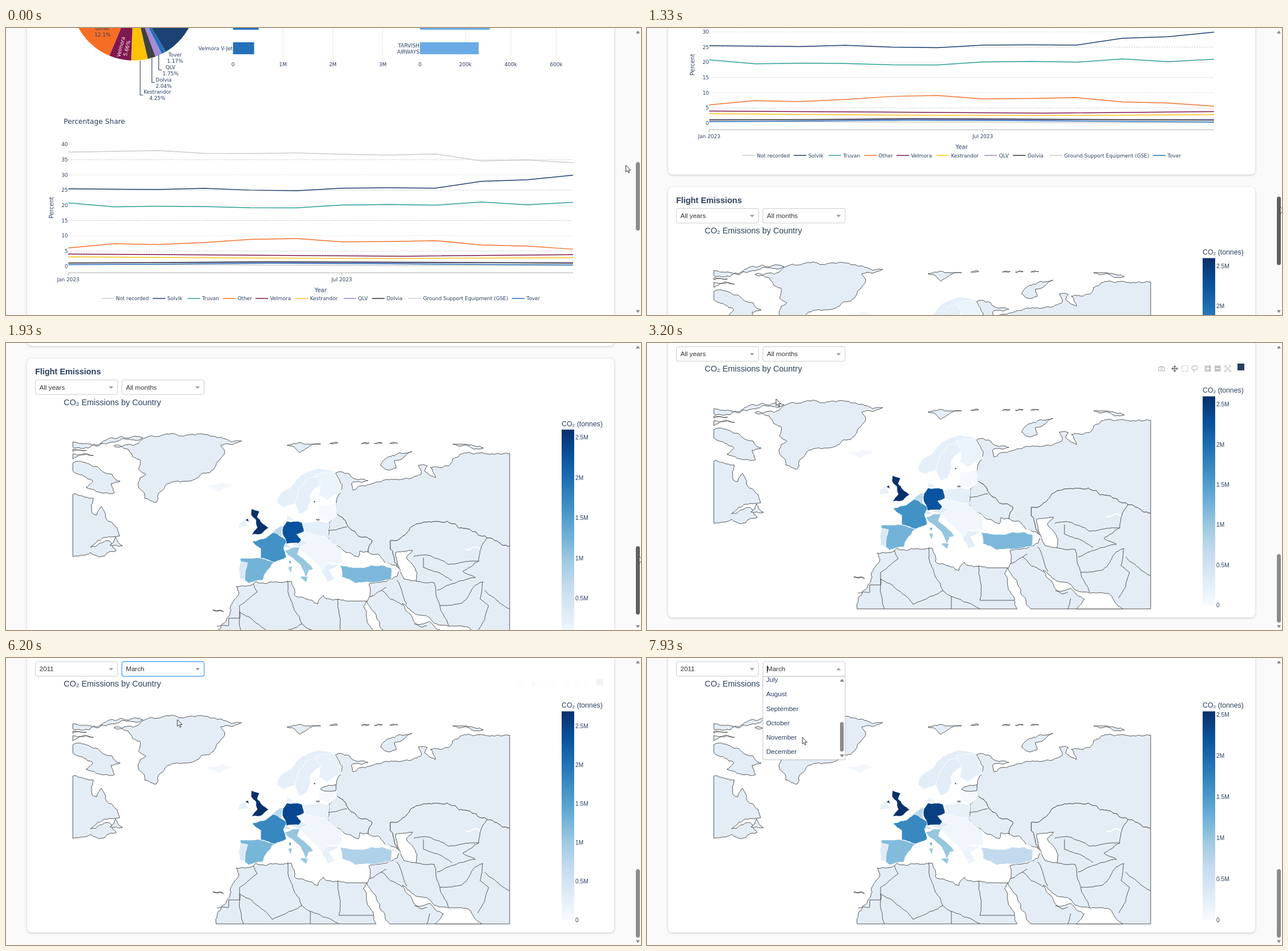
Animation of 1112x503 px, one loop 8 s. Source, as an HTML page:

```html
<!DOCTYPE html>
<html lang="en">
<head>
<meta charset="utf-8">
<title>Flight dashboard</title>
<style>
  html, body { margin: 0; height: 100%; overflow: hidden; background: #fafafa; }
  svg { display: block; }
  text { white-space: pre; }
  .card { fill: #fff; filter: drop-shadow(0 1px 2px #0003); }
  .share { font: 8.85px "DejaVu Sans", Verdana, sans-serif; fill: #2a3f5f; }
  .map { font: 10.2px "Liberation Sans", Arial, sans-serif; fill: #2a3f5f; }
  .land, .sea, .border { fill: #e4edf5; stroke: #444; stroke-width: .9; stroke-linejoin: round; }
  .sea { fill: #fff; }
  .border { fill: none; }
  .country { stroke: #fff; stroke-width: .8; stroke-linejoin: round; }
  .control { font-size: 11.6px; }
</style>
</head>
<body>
<svg id="stage" width="1112" height="503" viewBox="0 0 1112 503"></svg>
<script>
const LOOP = 8000, PAGE_SCROLL = 560.5, ROW = 25.3;

const $ = id => document.getElementById(id);
const text = (x, y, s, attrs = '') => `<text x="${x}" y="${y}" ${attrs}>${s}</text>`;
const middle = (x, y, s, attrs = '') => text(x, y, s, `text-anchor="middle" ${attrs}`);
const rect = (x, y, w, h, attrs) => `<rect x="${x}" y="${y}" width="${w}" height="${h}" ${attrs}/>`;
const path = (d, attrs) => `<path d="${d}" ${attrs}/>`;
const range = (n, f) => Array.from({ length: n }, (_, i) => f(i)).join('');

// Monotone cubic through keys [time, ...values]
function track(keys, t) {
  const last = keys.length - 1;
  if (t <= keys[0][0]) return keys[0].slice(1);
  if (t >= keys[last][0]) return keys[last].slice(1);
  const i = keys.findIndex(k => k[0] > t) - 1;
  const span = keys[i + 1][0] - keys[i][0], u = (t - keys[i][0]) / span;
  return keys[i].slice(1).map((a, n) => {
    const c = n + 1, b = keys[i + 1][c];
    const slope = j => (keys[j + 1][c] - keys[j][c]) / (keys[j + 1][0] - keys[j][0]);
    const tangent = j => {
      if (j === 0 || j === last) return 0;
      const p = slope(j - 1), q = slope(j);
      return p * q > 0 ? 2 * p * q / (p + q) : 0;
    };
    const v = 1 - u;
    return a * v * v * (1 + 2 * u) + b * u * u * (3 - 2 * u)
      + span * u * v * (v * tangent(i) - u * tangent(i + 1));
  });
}

// ---------- aircraft share charts ----------
const monthX = m => 109 + 884 * (m * 30.4 - (m > 1 && m < 7 ? 1 : 0)) / 334.4;
const valueY = v => 417.5 - v * 5.335;

// Values are spread evenly over the twelve months
function series(name, color, x, values) {
  const points = values.map((v, i) => `${monthX(11 * i / (values.length - 1))},${valueY(v)}`).join(' ');
  return `<polyline points="${points}" fill="none" stroke="${color}" stroke-width="1.5"/>`
    + path(`M${x},474h22`, `stroke="${color}" stroke-width="1.5"`) + text(x + 25.5, 477.2, name);
}

function pie() {
  const cx = 223.5, cy = -53, r = 110;
  const at = deg => `${cx + r * Math.sin(deg * Math.PI / 180)},${cy + r * Math.cos(deg * Math.PI / 180)}`;
  let angle = 150;
  const slice = (sweep, color) => {
    const from = at(angle);
    angle -= sweep;
    return path(`M${cx},${cy}L${from}A${r},${r} 0 0 1 ${at(angle)}Z`, `fill="${color}"`);
  };
  return slice(119.2, '#1c4173') + slice(4.2, '#2471b9') + slice(6.3, '#a58bd8') + slice(7.3, '#404040')
    + slice(15.3, '#ffc107') + slice(20.4, '#7f1750') + slice(43.6, '#f76d23');
}

const sliceLabel = (name, share, x, y) => middle(x, y, name) + middle(x, y + 11, share);

function bars(x, step, labels, color, widths) {
  return labels.map((label, i) => {
    const gx = x + i * step;
    return (i ? path(`M${gx},0V57`, 'stroke="#ccc" stroke-width=".8" stroke-dasharray="2 2"') : '')
      + middle(gx, 66.5, label);
  }).join('') + widths.map((w, i) => rect(x, -18 + i * 43, w, 21, `fill="${color}"`)).join('');
}

const shareCard = rect(37, -60, 1028, 567.5, 'rx="8" class="card"') + '<g class="share">'
  + pie() + middle(169, 4, 'Other') + middle(169, 15, '12.1%')
  + `<g transform="translate(206 34) rotate(-76)" fill="#fff">${sliceLabel('Velmora', '5.66%', 0, -2)}</g>`
  + sliceLabel('Tover', '1.17%', 296, 50) + sliceLabel('QLV', '1.75%', 288, 72)
  + sliceLabel('Dolvia', '2.04%', 276, 93.5) + sliceLabel('Kestrandor', '4.25%', 265, 115)
  + path('M267.5,47V73.5H273M255.5,53V95.5H261M235,57V117.5H240', 'fill="none" stroke="#2a3f5f" stroke-width="1.1"')
  + bars(397.5, 87.4, ['0', '1M', '2M', '3M'], '#2471b9', [45, 37])
  + bars(724.8, 79.6, ['0', '200k', '400k', '600k'], '#6aabe6', [122.5, 103])
  + text(397, 39, 'Velmora V-Jet', 'text-anchor="end"')
  + text(724, 33.5, 'TARVISH', 'text-anchor="end"') + text(724, 44.5, 'AIRWAYS', 'text-anchor="end"')
  + text(101, 167.5, 'Percentage Share', 'font-size="12.2"')
  + range(7, i => path(`M109,${valueY(5 * i + 5)}H993`,
    `stroke="${i % 2 ? '#ddd' : '#c4c4c4'}" stroke-dasharray="2.2 2.2"`))
  + range(9, i => text(108.5, valueY(5 * i) + 3.3, 5 * i, 'text-anchor="end"'))
  + path('M109,434V429H993M588,429V434', 'fill="none" stroke="#c8c8c8" stroke-width="1.5"')
  + middle(109, 443.5, 'Jan 2023') + middle(588, 443.5, 'Jul 2023')
  + middle(551, 462.5, 'Year', 'font-size="10.1"')
  + middle(0, 0, 'Percent', 'font-size="10.1" transform="translate(83 315) rotate(-90)"')
  + series('Not recorded', '#ccc', 167, [37.5, 37.7, 38, 37.05, 37, 37.2, 36.8, 36.5, 36.9, 34.6, 34.9, 34])
  + series('Solvik', '#1c4173', 257, [25.45, 25.3, 25.2, 25.6, 25, 24.8, 25.65, 25.75, 25.65, 27.9, 28.4, 29.9])
  + series('Truvan', '#2ca098', 318, [20.8, 19.5, 19.7, 19.6, 19.2, 19.15, 20.1, 20.3, 20.05, 21.1, 20.2, 21])
  + series('Other', '#f3722c', 380, [6, 7.4, 7.1, 7.8, 8.8, 9.1, 8, 8.1, 8.4, 7, 6.6, 5.6])
  + series('Velmora', '#7f1750', 437, [4, 3.65, 3.3, 3.8])
  + series('Kestrandor', '#fcc21b', 507, [3.1, 2.7, 2.55, 2.8])
  + series('QLV', '#9b85d0', 591, [1.1, 1.2, 1.1, 1.2])
  + series('Dolvia', '#333', 641, [1.1, 1.2, 1.5, 1.35, 1.2, 1])
  + series('Ground Support Equipment (GSE)', '#ccc', 705, [.6, .4, .2, .3])
  + series('Tover', '#2471b9', 886, [.5, .7, 1, .85, .6, .4])
  + '</g>';

// ---------- emissions map ----------
// Repeatable noise by place, so that shared edges of neighbours agree
const noise = (x, y) => {
  const n = Math.sin(x * 12.9898 + y * 78.233) * 43758.5453;
  return n - Math.floor(n) - .5;
};

function roughen([ax, ay], [bx, by], amount) {
  const length = Math.hypot(bx - ax, by - ay);
  if (length < 5 || ax === bx || ay === by) return [[ax, ay]];
  const mx = (ax + bx) / 2, my = (ay + by) / 2;
  const mid = [mx + noise(mx, my) * length * amount, my + noise(my, mx) * length * amount];
  return [...roughen([ax, ay], mid, amount), ...roughen(mid, [bx, by], amount)];
}

function outline(points, amount, closed = true) {
  const list = points.split(' ').map(p => p.split(',').map(Number));
  const edges = closed ? list : list.slice(0, -1);
  const line = edges.flatMap((p, i) => roughen(p, list[(i + 1) % list.length], amount));
  return 'M' + (closed ? line : [...line, list.at(-1)]).join('L') + (closed ? 'Z' : '');
}

let terrain = '';
const fills = [];
const land = points => { terrain += path(outline(points, .3), 'class="land"'); };
const sea = points => { terrain += path(outline(points, .18), 'class="sea"'); };
const border = points => { terrain += path(outline(points, .15, false), 'class="border"'); };
// One fill for each filter state
const country = (points, ...colors) => {
  fills.push(colors);
  terrain += path(outline(points, .16), 'class="country"');
};

// North America and the Arctic
land('117,207 139,212 153,214 151,240 159,243 167,228 185,256 199,280 167,286 148,300 180,288 193,306 173,315 148,309 117,316');
land('182,296 192,282 204,297');
land('117,152 138,151 166,164 186,172 200,184 184,188 190,204 164,203 140,195 152,184 117,166');
land('117,115 200,106 240,108 175,119 117,124');
land('117,128 141,130 117,132');
land('117,136 153,139 117,145');
land('189,122 244,108 303,105 376,107 413,113 376,121 383,134 371,149 357,169 317,184 279,192 263,221 243,214 231,190 245,172 232,163 234,146 214,128');
land('492,121 522,119 551,119 515,134');
land('782,119 806,119 836,126 820,128');
land('656,156 690,134 711,132 680,148 683,161 664,163');
for (const x of [567, 622, 645, 672]) land(`${x},118 ${x + 7},116 ${x + 14},117`);

// Asia and Africa
land('577,170 602,172 634,183 605,188 608,200 622,192 662,182 712,178 727,171 722,156 738,157 733,166 752,178 743,160 775,157 782,145 832,134 882,135 882,298 842,283 812,268 773,254 735,256 706,270 673,288 673,303 692,338 663,326 634,308 641,288 605,270 580,242 578,222 587,203 589,190');
land('580,242 605,270 641,288 634,308 620,306 617,317 596,309 588,303 563,282 566,256');
land('692,338 673,303 673,288 706,270 735,256 773,254 812,268 842,283 882,298 882,466 672,466 650,426 632,395 636,364 674,356');
land('403,368 425,367 500,360 505,383 546,399 556,384 595,394 632,394 626,404 648,466 368,466 372,444 393,403 408,380');
land('362,410 368,411 381,413 370,412');
land('539,220 541,219 541,221');
land('543,251 549,250 549,252');
sea('682,309 712,305 701,317 720,345 718,359 697,355 685,326');
sea('694,398 717,417 742,423 750,433 810,440 833,466 752,466 766,449 742,430 720,435');

border('433,364 440,378 409,402 409,424 390,424 390,437 369,438');
border('409,413 453,443 466,458 518,434 505,410 493,358');
border('518,434 533,444 583,466');
border('581,390 583,451 643,451');
border('409,413 416,466');
border('533,444 533,466');
border('714,316 742,314 775,330 828,324 832,301 842,283');
border('731,318 731,335 760,345 781,358');
border('828,324 800,342 822,353 785,363 755,375');
border('718,359 750,362 760,402 775,437');
border('760,402 798,398 822,366 835,360');
border('835,360 830,390 845,402 826,447');
border('838,375 882,408');
border('684,357 695,382 702,400');
border('666,370 636,387');
border('657,375 694,401');
border('715,434 728,440 737,437');
border('742,448 737,466');
border('563,270 597,264');

// Europe
country('351,192 378,186 397,193 372,203', '#f3f7fc');
country('475,222 478,210 500,193 517,173 550,162 578,167 530,178 513,198 506,222 486,230', '#e5eff9', '#e6eefa', '#e2edf8');
country('506,222 513,198 530,178 548,176 551,190 532,207 534,218 526,236 513,242', '#e6eefa', '#e6eefa', '#e2edf8');
country('540,172 575,168 588,203 562,217 547,208 551,190', '#ebf3fb', '#e8f1fa', '#e5eff9');
country('548,226 578,222 580,242 566,255 548,250', '#f5f9fe');
country('406,266 410,256 418,251 425,263', '#e8f1fa');
country('491,254 492,243 506,252', '#e8f1fa');
country('509,277 522,273 563,282 588,303 588,328 562,328 553,341 527,314 515,300 517,288', '#f1f6fd');
country('520,258 548,253 566,258 563,282 522,273', '#e5eff9', '#e9f2fa', '#e9f2fa');
country('553,341 562,328 584,330 566,340 576,355 563,361', '#e3eef8', '#e8f1fa', '#eef4fb');
country('466,274 479,263 485,262 483,284', '#bcd8eb');
country('484,300 491,294 501,300', '#d3e4f3');
country('499,295 517,288 532,291 515,300', '#e0ecf7');
country('411,325 423,327 418,357 409,355', '#d9e8f5', '#dce9f6', '#e0ebf7');
country('410,319 432,319 459,323 470,326 453,347 449,358 425,363 418,357 423,327 411,325', '#73b3d8', '#78b6d9', '#82bbdb');
country('431,290 454,284 467,274 492,287 486,300 491,317 470,326 446,319 446,302', '#4292c6', '#3787c0', '#3989c1');
country('495,324 500,323 498,331', '#4292c6', '#3787c0', '#3989c1');
country('484,276 485,264 492,254 518,256 522,272 509,277 517,287 512,293 491,294', '#0a539e', '#084890', '#084083');
country('488,306 501,300 515,299 510,312 538,338 530,340 525,352 516,331 498,316', '#97c6df');
country('515,352 529,351 526,361', '#97c6df');
country('494,334 501,333 499,346', '#97c6df');
country('430,232 444,237 440,247 460,266 448,276 430,278 440,265 437,251 429,243', '#08306b');
country('418,252 424,249 426,256', '#08306b');
country('663,324 692,342 676,340', '#f0f5fb');
country('585,331 606,335 640,331 675,336 674,356 636,361 612,363 588,352', '#7db8da', '#b0d2e8', '#c3daee');

const blues = ['#08306b', '#08519c', '#2171b5', '#4292c6', '#6baed6', '#9ecae1', '#c6dbef', '#deebf7', '#f7fbff'];

const icon = (x, d, opacity = .32) => path(d,
  `transform="translate(${x} 45)" fill="none" stroke="#444" stroke-opacity="${opacity}" stroke-width="1.4"`);
const zoomBox = x => rect(x - 5, 39.5, 10.5, 10.5, 'fill="#444" fill-opacity=".32"') + path(`M${x - 3},44.8h6.5`, 'stroke="#fff" stroke-width="1.6"');
const modebar = '<g id="modebar">'
  + icon(901, 'M-5,-2.5H5V3.5H-5ZM-2,-4H2M-2,.5H2')
  + icon(924, 'M-5,0H5M0,-5V5M-2,-3L0,-5 2,-3M-2,3L0,5 2,3M-3,-2L-5,0 -3,2M3,-2L5,0 3,2', .75)
  + rect(936.8, 39.6, 10, 10, 'fill="none" stroke="#444" stroke-opacity=".32" stroke-width="1.4" stroke-dasharray="2 1.3"')
  + icon(959, 'M-2,2C-8,1 -5,-5 1,-5S7,1 0,2C-4,0 -3,4 0,5')
  + zoomBox(982) + path('M982.2,41.5v6.5', 'stroke="#fff" stroke-width="1.6"') + zoomBox(999)
  + icon(1017, 'M-5,-2V-5H-2M2,-5H5V-2M5,2V5H2M-2,5H-5V2M-3,-3L3,3M3,-3L-3,3')
  + rect(1034, 36, 12, 12, '') + '</g>';

const mapCard = rect(37, -31, 1028, 512, 'rx="8" class="card"') + '<g class="map">'
  + text(51, -3, 'Flight Emissions', 'font-size="14.4" font-weight="bold"')
  + text(101, 50.3, 'CO₂ Emissions by Country', 'font-size="14.4"')
  + terrain
  + path('M804,303Q811,306 817,301T830,304', 'fill="none" stroke="#fff" stroke-width="2"')
  + path(outline('551,230 565,223 578,222 577,233', .2), 'id="noData" class="land"')
  + text(973, 87.4, 'CO₂ (tonnes)', 'font-size="12.3"')
  + `<linearGradient id="blues" x2="0" y2="1">${blues.map((c, i) => `<stop offset="${i / 8}" stop-color="${c}"/>`).join('')}</linearGradient>`
  + rect(973, 93.5, 22, 366, 'fill="url(#blues)"')
  + `<g id="ticks"></g>${modebar}<g id="controls" class="control"></g></g>`;

$('stage').innerHTML = `<g id="share">${shareCard}</g><g id="emissions">${mapCard}</g>`
  + rect(1101, 0, 11, 503, 'fill="#fafafa"')
  + path('M1103,9.5h7l-3.5,-5ZM1103,494.5h7l-3.5,5Z', 'fill="#858585"')
  + rect(1103, 235, 7, 120, 'rx="3.5" id="thumb"')
  + path('M0,0V11.6L2.7,9.2 4.6,13.5 6.5,12.7 4.7,8.5H8.3Z', 'id="cursor" fill="#fff" stroke="#222" stroke-width=".9"');
const countryShapes = [...document.querySelectorAll('.country')];

// ---------- dropdowns ----------
const years = ['All years', ...Array.from({ length: 15 }, (_, i) => String(2010 + i))];
const months = ['All months', 'January', 'February', 'March', 'April', 'May', 'June', 'July',
  'August', 'September', 'October', 'November', 'December'];

function dropdown(x, options, chosen, open, focused, cursorY, scroll) {
  const stroke = focused ? '#1e90f5' : '#ccc', ax = x + 133;
  let out = (focused ? rect(x - 1, 5, 146.5, 28.5, 'rx="4" fill="#007eff" fill-opacity=".12"') : '')
    + rect(x + .5, 6.5, 144, 25.5, `rx="3" fill="#fff" stroke="${stroke}"`)
    + text(x + 7.5, 23.4, options[chosen], 'fill="#333"')
    + path(open ? `M${ax - 4},21.5h8l-4,-4Z` : `M${ax - 4},17.8h8l-4,4Z`, 'fill="#999"');
  if (!open) return out;
  const hover = cursorY > 33 ? Math.floor((cursorY - 33) / ROW) : chosen;
  const ratio = 118 / (options.length * ROW);
  out += path(`M${x + 8},13V26`, 'stroke="#222"')
    + rect(x + .5, 32.5, 144, 145.5, 'fill="#fff" stroke="#ccc" style="filter:drop-shadow(0 1px 1px #0001)"')
    + `<svg x="${x + 1}" y="33" width="143" height="144.5">`
    + options.map((option, i) => {
      const y = i * ROW - scroll;
      return (i === hover ? rect(0, y, 132, ROW, 'fill="#007eff" fill-opacity=".1"') : '')
        + text(5.2, y + 16.8, option, i === chosen ? 'font-weight="bold"' : '');
    }).join('')
    + path('M134,8.5h8l-4,-5ZM134,136h8l-4,5Z', 'fill="#858585"')
    + rect(134.5, 13 + scroll * ratio, 6.5, 144 * ratio, 'rx="3.2" fill="#8b8b8b"') + '</svg>';
  return out;
}

// ---------- timeline ----------
const pageKeys = [[733, 0], [1000, 73.4], [1600, 386.3], [2267, PAGE_SCROLL]];
const listKeys = [[7667, 0], [7933, 185]];
const cursorKeys = [[0, 1085.5, 240.5], [267, 1109, 253], [733, 1109, 253], [1000, 1109, 271],
  [1600, 1109, 346], [2267, 1109, 388], [2667, 1109, 388], [3200, 226, 98], [3533, 100, 17],
  [3800, 100, 17], [4267, 110, 91], [4533, 110, 91], [4867, 232, 50], [5200, 262, 17], [5400, 262, 17],
  [5867, 296, 114], [6133, 296, 114], [6200, 300, 108], [6533, 312, 80], [6800, 312, 80],
  [7133, 272, 17], [7333, 272, 17], [7667, 272, 139]];

// Fades in from `start`, and out again from `end`
const fade = (t, start, end) => Math.max(0, Math.min(1, (t - start) / 267, 1 - (t - end) / 267));

function draw(now) {
  const t = Math.round(Math.floor((now % LOOP + 4) * .015) / .015);
  const during = (a, b) => t >= a && t < b;
  const [scroll] = track(pageKeys, t), [x, y] = track(cursorKeys, t);
  const state = t < 4800 ? 0 : t < 6400 ? 1 : 2;

  $('share').setAttribute('transform', `translate(0 ${-scroll})`);
  $('emissions').setAttribute('transform', `translate(0 ${PAGE_SCROLL - scroll})`);
  $('thumb').setAttribute('y', 235 + scroll * .241);
  $('thumb').setAttribute('fill', during(200, 2733) ? '#606060' : '#8b8b8b');
  $('cursor').setAttribute('transform', `translate(${x} ${y})`);
  $('modebar').setAttribute('opacity', fade(t, 2733, 3400) + fade(t, 4600, 5067) + fade(t, 6183, 6933));

  countryShapes.forEach((shape, i) => shape.setAttribute('fill', fills[i][state] || fills[i][0]));
  $('noData').setAttribute('visibility', state ? 'visible' : 'hidden');
  const gap = [70.4, 68, 72][state];
  $('ticks').innerHTML = range(6, i => text(997, 463.2 - i * gap, i ? i / 2 + 'M' : '0'));

  const monthsOpen = during(5300, 6200) || t >= 7267;
  $('controls').innerHTML =
    dropdown(51, years, t < 4600 ? 0 : 2, during(3600, 4600), during(4600, 5300), y, 0)
    + dropdown(202.5, months, t < 6200 ? 0 : 3, monthsOpen, during(6200, 7267), y, track(listKeys, t)[0]);
}

function loop() {
  draw(performance.now());
  requestAnimationFrame(loop);
}
loop();
</script>
</body>
</html>
```
